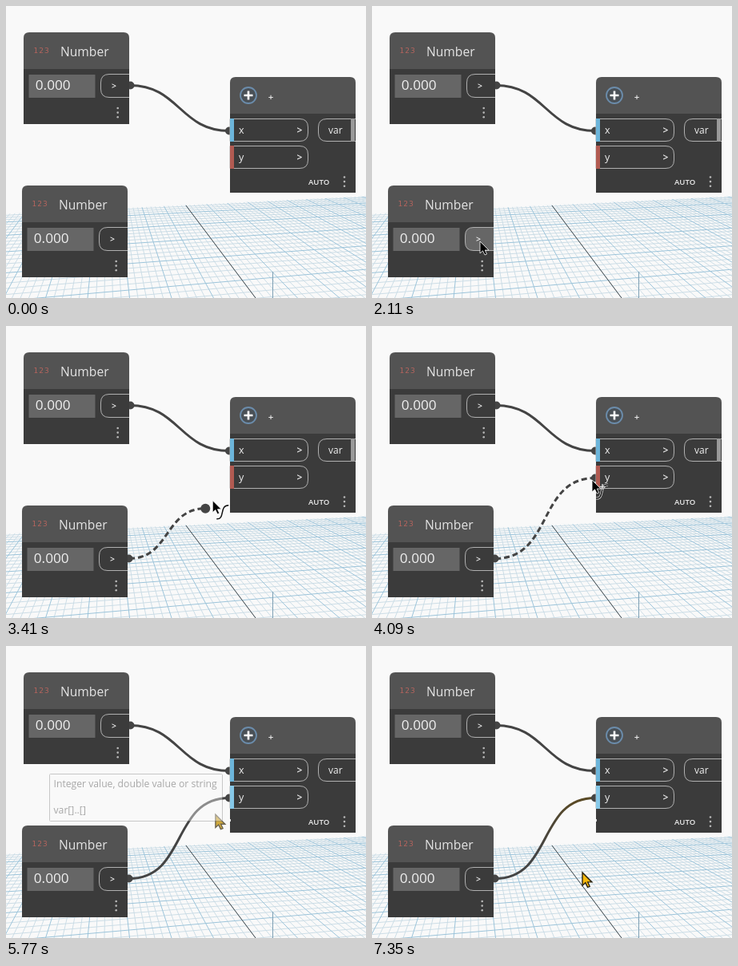
An HTML page for the animation above (8500 ms loop, 450x366 px).

```html
<!DOCTYPE html>
<html lang="en">
<head>
<meta charset="utf-8">
<title>Connecting nodes</title>
<style>
html, body { margin: 0; width: 100%; height: 100%; overflow: hidden; background: #f9f9f9; }
svg { display: block; width: 450px; height: 366px; font-family: "Open Sans", "Noto Sans", sans-serif; font-weight: 500; fill: #f0f0f0; }
.head { fill: #535353; }
.body { fill: #3b3b3b; }
.port { fill: #3b3b3b; stroke: #b0b0b0; }
.hover { fill: #666; }
.dots { fill: #b8b8b8; }
.wire { fill: none; stroke: #444; stroke-width: 3; }
.knob { fill: #444; }
.small { font-size: 12.5px; }
.arrow { font-size: 12px; font-weight: 600; }
.out { font-size: 10.5px; }
.icon { font: 9px "DejaVu Sans", sans-serif; letter-spacing: 1px; fill: #b5645d; }
.tip rect { fill: #f9f9f9; stroke: #7e7e7e; }
.tip text { fill: #333; font-size: 12.2px; }
</style>
</head>
<body>
<svg viewBox="0 0 450 366">
  <defs>
    <clipPath id="floor"><path d="M0 260.5L450 238.5V366H0Z"/></clipPath>
    <linearGradient id="warm" gradientUnits="userSpaceOnUse" x1="205" y1="0" x2="250" y2="0">
      <stop stop-color="#444"/><stop offset="1" stop-color="#594a26"/>
    </linearGradient>
    <g id="dots" class="dots">
      <circle r="1.3"/><circle cy="5.6" r="1.3"/><circle cy="11.2" r="1.3"/>
    </g>
    <g id="number">
      <rect class="body" y="40" width="132" height="75"/>
      <path class="head" d="M0 46V7Q0 0 7 0H125Q132 0 132 7V46Z"/>
      <text class="icon" x="12.5" y="26">123</text>
      <text x="46" y="30" font-size="15.6" fill="#e4e4e4">Number</text>
      <rect x="6.5" y="53" width="83" height="29" fill="#666"/>
      <text x="14.8" y="72" font-size="17.2">0.000</text>
      <use href="#dots" x="117.7" y="95"/>
    </g>
    <path id="outPort" d="M132 52.5H107Q96.5 52.5 96.5 63V71Q96.5 81.5 107 81.5H132"/>
    <path id="inPort" d="M280 .5H367Q377.5 .5 377.5 11V18Q377.5 28.5 367 28.5H280Z"/>
  </defs>

  <g clip-path="url(#floor)" fill="none">
    <path id="minor" stroke="#c8dbe5" stroke-width=".9"/>
    <path id="major" stroke="#9cc4da"/>
    <path d="M225 250L312 366" stroke="#4c4c4c"/>
    <path d="M333.5 333V366" stroke="#7d9fb4"/>
  </g>

  <path id="topWire" class="wire"/>
  <circle class="knob" cx="155.500" cy="99.500" r="5"/>
  <circle class="knob" cx="279" cy="156.500" r="5"/>
  <g id="link">
    <path id="linkWire" class="wire"/>
    <circle class="knob" cx="153.500" cy="291.500" r="5"/>
    <circle id="linkEnd" class="knob"/>
  </g>

  <g transform="translate(22 33)">
    <use href="#number"/><use href="#outPort" class="port"/>
    <text class="arrow out" x="110" y="71">&gt;</text>
  </g>
  <g transform="translate(20 225)">
    <use href="#number"/><use href="#outPort" class="port" id="outHover"/>
    <text class="arrow out" x="110" y="71">&gt;</text>
  </g>

  <rect class="body" x="280" y="130" width="157" height="104"/>
  <path class="head" d="M280 135V96Q280 89 287 89H430Q437 89 437 96V135Z"/>
  <circle cx="303" cy="112" r="10" fill="#4a5157" stroke="#6b8cab" stroke-width="1.800"/>
  <path d="M297.500 112H308.500M303 106.500V117.500" stroke="#fff" stroke-width="2.600"/>
  <text x="327.800" y="117.500" font-size="11.500" font-weight="600">+</text>
  <use href="#inPort" class="port" y="141"/>
  <rect x="280" y="141" width="5" height="29" fill="#6cb5da"/>
  <text class="small" x="291" y="160">x</text>
  <text class="arrow" x="363.500" y="160">&gt;</text>
  <use href="#inPort" class="port" id="yPort" y="175"/>
  <rect id="yMark" x="280" y="175" width="5" height="29"/>
  <text class="small" x="291" y="194">y</text>
  <text class="arrow" x="363.500" y="194">&gt;</text>
  <path class="port" d="M437 141.500H401Q390.500 141.500 390.500 152V159Q390.500 169.500 401 169.500H437"/>
  <text x="403" y="160" font-size="12">var</text>
  <rect id="varMark" x="431" y="141" width="5" height="29" fill="#999"/>
  <text x="378" y="224" font-size="9.600" font-weight="600">AUTO</text>
  <use href="#dots" x="423" y="214.500"/>
  <rect id="tick" x="280" y="217" width="1" height="3" fill="#ddd"/>

  <g id="preview" class="tip">
    <rect x="280.500" y="240.500" width="156" height="31"/>
    <text x="290" y="260">0</text>
  </g>

  <g id="cursor">
    <path id="pointer" d="M0 0V15L3.500 11.800 6 17 8.500 16 6.200 11H11Z"/>
    <g id="wireIcon" fill="none">
      <path d="M5 23C16 24 8 6 20 6" stroke="#fff" stroke-opacity=".85" stroke-width="3"/>
      <path d="M5 23C16 24 8 6 20 6" stroke="#111" stroke-width="1.500"/>
      <path id="plusIcon" d="M9.500 8.500H16.500M13 5V12" stroke="#ddd" stroke-width="1.400"/>
    </g>
  </g>

  <g id="outTip" class="tip">
    <rect x="160.500" y="280.500" width="43" height="22"/>
    <text x="164" y="296" style="font-size:11px">double</text>
  </g>
  <g id="inTip" class="tip">
    <rect x="54.500" y="160.500" width="216" height="59" rx="1"/>
    <text x="59.500" y="177">Integer value, double value or string</text>
    <text x="59.500" y="210">var[]..[]</text>
  </g>
</svg>
<script>
const LOOP = 8500;
const $ = id => document.getElementById(id);
const show = (id, on) => { $(id).style.display = on ? '' : 'none'; };
const set = (id, attrs) => {
  for (const name in attrs) $(id).setAttribute(name, attrs[name]);
};

// Perspective floor: two line families, evenly spaced where they cross y = 366.
function drawFloor() {
  const lines = { minor: '', major: '' };
  const fan = (vx, from, step, first, last) => {
    for (let i = first; i <= last; i++) {
      const x = from + i * step;
      lines[i % 5 ? 'minor' : 'major'] += `M${vx} 120L${2 * x - vx} 612`;
    }
  };
  fan(127, 312, 10.5, -42, 90);
  fan(2850, 40, 92, -25, 6);
  for (const id in lines) set(id, { d: lines[id] });
}

// Horizontal handles grow with the distance between the ends.
function wirePath(x1, y1, x2, y2) {
  const reach = .45 * Math.hypot(x2 - x1, y2 - y1);
  return `M${x1} ${y1}C${x1 + reach} ${y1} ${x2 - reach} ${y2} ${x2} ${y2}`;
}

// Each key is [time, ...values]; values are held outside the keys.
function track(keys, t) {
  const next = keys.findIndex(key => key[0] > t);
  if (next < 0) return keys[keys.length - 1].slice(1);
  if (next === 0) return keys[0].slice(1);
  const a = keys[next - 1], b = keys[next];
  const k = (t - a[0]) / (b[0] - a[0]);
  return a.slice(1).map((v, i) => v + (b[i + 1] - v) * k);
}

const cursorPath = [
  [330, 126, 356], [470, 152, 340], [740, 213, 307],
  [940, 222, 314], [1110, 255, 340], [1350, 174, 309], [1640, 148, 301],
  [1780, 147, 300], [2110, 135, 295],
  [2720, 140, 292], [2850, 214, 259], [3200, 245, 235], [3550, 267, 208],
  [3620, 268, 206], [4090, 275, 193], [4430, 289, 190],
  [5560, 289, 190], [5770, 262, 211], [6080, 236, 303], [6470, 245, 292],
  [6750, 277, 282], [7080, 264, 283], [7349, 264, 283], [7350, 263, 284]
];
const outTipFade = [[2250, .2], [2450, .9]];
const inTipFade = [[5630, .1], [5770, .4], [5910, .85], [6050, .85], [6330, 0]];

const plainPointer = { fill: '#000', stroke: '#fff', 'stroke-width': .8, transform: 'scale(1)' };
const goldPointer = { fill: '#f6b90c', stroke: '#2b2412', 'stroke-width': 1.3, transform: 'scale(1.08)' };
const dullPointer = { ...goldPointer, fill: '#cfa93c', stroke: '#6b6350' };

function drawLink(t, x, y) {
  const snapped = t >= 3900;
  const linked = t >= 4750;
  const [ex, ey] = snapped ? [279, 190.5] : [x - 9, y + 10];
  show('link', t >= 2720);
  set('linkWire', {
    d: wirePath(154, 291.5, ex, ey),
    'stroke-dasharray': linked ? 'none' : '7 4'
  });
  $('linkWire').style.stroke = t >= 6470 ? 'url(#warm)' : '';
  set('linkEnd', { cx: ex, cy: ey, r: snapped ? 5 : 6 });
}

function render(t) {
  const [x, y] = track(cursorPath, t);
  const linked = t >= 4750;
  const fade = t >= 5630 ? track(inTipFade, t)[0] : 0;

  drawLink(t, x, y);
  $('outHover').classList.toggle('hover', t >= 1850 && t < 2720);
  $('yPort').classList.toggle('hover', linked && t < 5630);
  set('yMark', { fill: linked ? '#86c8e8' : '#b25b52' });
  show('varMark', !linked);
  show('tick', t >= 5770);

  show('preview', t >= 5440 && t < 5630);
  show('outTip', t >= 2250 && t < 2720);
  set('outTip', { opacity: track(outTipFade, t)[0] });
  set('inTip', { opacity: fade });

  show('cursor', t >= 330);
  set('cursor', { transform: `translate(${x} ${y})` });
  set('pointer', !linked ? plainPointer : fade > 0 ? dullPointer : goldPointer);
  show('wireIcon', t >= 2720 && !linked);
  show('plusIcon', t >= 3900);
}

drawFloor();
set('topWire', { d: wirePath(155, 99.5, 279, 156.5) });
const start = performance.now();
function frame() {
  render((performance.now() - start) % LOOP);
  requestAnimationFrame(frame);
}
frame();
</script>
</body>
</html>
```
